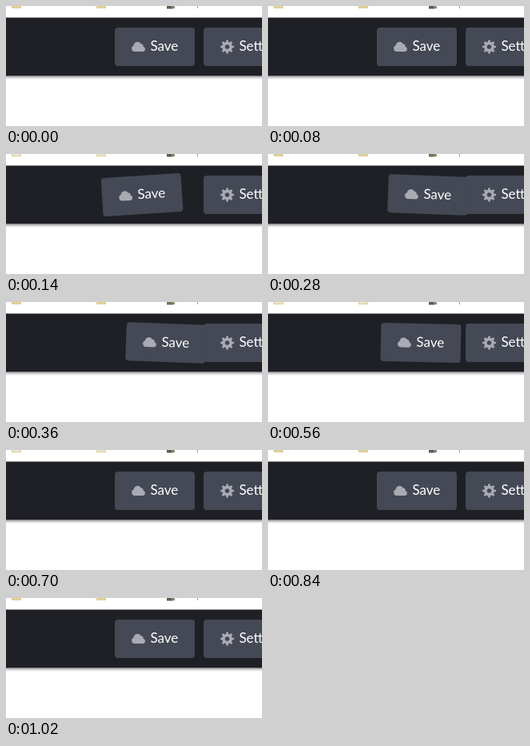
Recreate the animation shown at these times as an HTML page. Size 320x150 px, loop 1140 ms.

```html
<!DOCTYPE html>
<html lang="en">
<head>
<meta charset="utf-8">
<title>Wobbling save button</title>
<style>
  html, body { margin: 0; width: 100%; height: 100%; overflow: hidden; background: #fff; }
  svg { display: block; }
  text { font: 17px Lato, sans-serif; fill: #fff; }
  .button { fill: #444955; }
  .icon { fill: #a9abb2; }
  .folder { stroke: #dccd96; }
</style>
</head>
<body>
<svg width="320" height="150" viewBox="0 0 320 150">
  <defs>
    <linearGradient id="shadow" x2="0" y2="1">
      <stop stop-color="#77747a"/>
      <stop offset=".45" stop-color="#d0ced1"/>
      <stop offset="1" stop-color="#fff"/>
    </linearGradient>
  </defs>

  <!-- Lower edges of the icons above the toolbar -->
  <g id="folders">
    <rect class="folder" x="7.5" y="-4.5" width="11" height="7"/>
    <rect class="folder" x="113.5" y="-4.5" width="11" height="7"/>
  </g>
  <path id="badge" d="M201 0h6v3.5h-6z"/>
  <path d="M207 0h3q2 1 1 2.5q-1 1.3-4 1z" fill="#85826f"/>
  <path d="M239.5 0v3" stroke="#98969a"/>

  <rect y="87" width="320" height="5" fill="url(#shadow)"/>
  <rect y="14.5" width="320" height="72.5" fill="#1e2025"/>

  <g>
    <rect class="button" x="247" y="27" width="100" height="48" rx="4"/>
    <path id="gear" class="icon" fill-rule="evenodd" transform="translate(276.5 51)"/>
    <text x="291.4" y="56">Settings</text>
  </g>

  <g id="save">
    <rect class="button" x="136" y="27" width="100" height="48" rx="4"/>
    <path class="icon" d="M161 57a4 4 0 0 1-1.3-7.7a4.9 4.9 0 0 1 9.2-1.8a2.6 2.6 0 0 1 2.7 3.4a3.1 3.1 0 0 1-.8 6.1z"/>
    <text x="180.4" y="56">Save</text>
  </g>
</svg>

<script>
  const STEP = 140, LOOP = 1140;
  const byId = id => document.getElementById(id);
  const save = byId('save'), folders = byId('folders'), badge = byId('badge');

  // Each pose holds until the next step; the last one rests longer.
  const poses = [
    { x: 0, turn: 0 },
    { x: -16, turn: -3.7, pale: true },
    { x: 14, turn: 2.2, green: true },
    { x: -1.5, turn: -0.3, pale: true },
    { x: 5, turn: 1.3, pale: true },
    { x: 0, turn: 0, pale: true },
    { x: 0, turn: 0 }
  ];

  function gearPath(teeth, outer, inner, hole) {
    const pitch = 2 * Math.PI / teeth;
    const point = (r, a) => `${(r * Math.sin(a)).toFixed(2)} ${(-r * Math.cos(a)).toFixed(2)}`;
    const points = [];
    for (let i = 0; i < teeth; i++) {
      const a = i * pitch;
      points.push(point(inner, a - pitch * .27), point(outer, a - pitch * .19),
                  point(outer, a + pitch * .19), point(inner, a + pitch * .27));
    }
    return `M${points.join('L')}ZM${-hole} 0a${hole} ${hole} 0 1 0 ${2 * hole} 0a${hole} ${hole} 0 1 0 ${-2 * hole} 0`;
  }

  function draw() {
    const step = Math.floor(performance.now() % LOOP / STEP);
    const pose = poses[Math.min(step, poses.length - 1)];
    save.setAttribute('transform', `translate(${pose.x}) rotate(${pose.turn} 186 51)`);
    folders.setAttribute('fill', pose.pale ? '#ece6cb' : '#e0d196');
    badge.setAttribute('fill', pose.green ? '#627a52' : '#5c5a54');
    requestAnimationFrame(draw);
  }

  byId('gear').setAttribute('d', gearPath(8, 8.6, 6.4, 2.8));
  draw();
</script>
</body>
</html>
```
